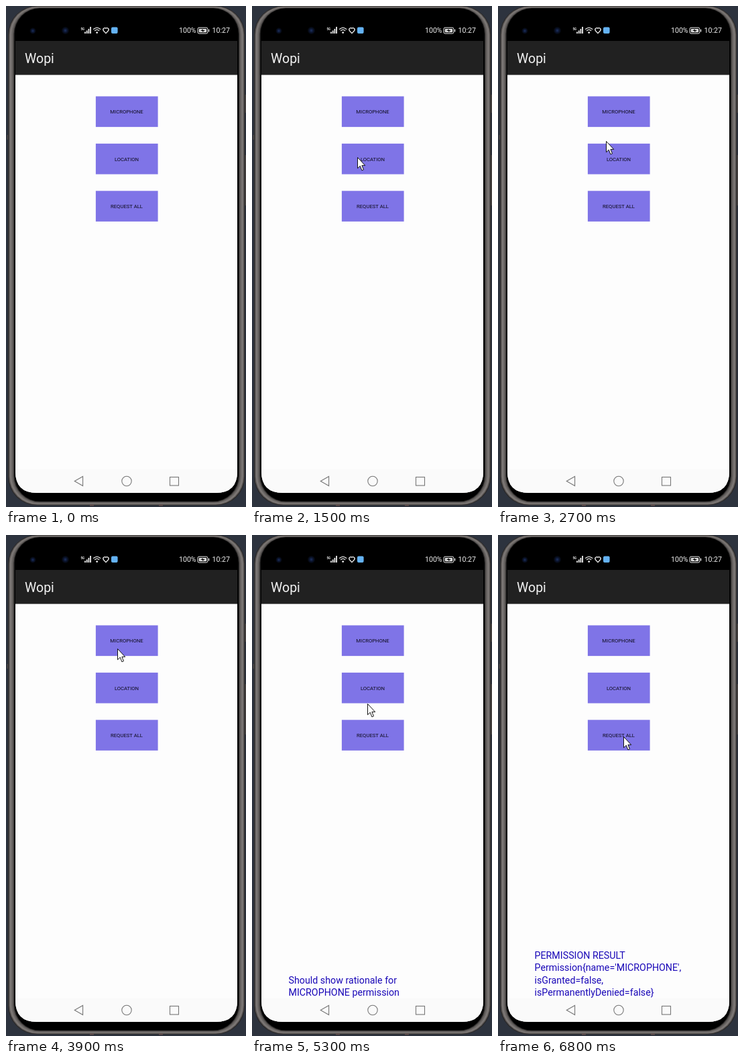
An HTML page for the animation above (8000 ms loop, 358 px wide and 746 px high).

```html
<!DOCTYPE html>
<html lang="en">
<head>
<meta charset="utf-8">
<title>Permission demo</title>
<style>
  html, body { margin: 0; width: 100%; height: 100%; overflow: hidden; background: #2d333e; }
  svg { display: block; width: 358px; height: 746px; font-family: Roboto, "Noto Sans", sans-serif; }
  .label { font-size: 7.7px; text-anchor: middle; fill: #0d0b1c; }
  .toast { font-size: 14.25px; fill: #1a08b8; }
  .status { font-size: 10.6px; fill: #eee; }
  .nav { fill: none; stroke: #777; stroke-width: 1.1; }
</style>
</head>
<body>
<svg viewBox="0 0 358 746">
  <defs>
    <radialGradient id="lens">
      <stop offset="0" stop-color="#1c3060"/>
      <stop offset=".5" stop-color="#0b142c"/>
      <stop offset="1" stop-color="#000"/>
    </radialGradient>
    <clipPath id="screen"><path d="M14 3H345V693Q345 725 313 725H46Q14 725 14 693Z"/></clipPath>
  </defs>

  <!-- phone body -->
  <g fill="#4a4644">
    <rect x="355" y="132" width="3" height="27"/>
    <rect x="355" y="222" width="3" height="75"/>
    <rect x="1.5" y="192" width="3" height="7"/>
  </g>
  <g id="body"></g>
  <g fill="#5b4a48">
    <rect x="125" y="742" width="6" height="2.5"/>
    <rect x="228" y="742" width="6" height="2.5"/>
  </g>

  <g clip-path="url(#screen)">
    <rect x="14" y="52" width="331" height="673" fill="#fdfdfd"/>
    <rect x="14" y="52" width="331" height="50.6" fill="#212121"/>
    <rect x="14" y="690" width="331" height="35" fill="#fafafa"/>
  </g>
  <text x="28" y="85" font-size="19.5" fill="#f2f2f2">Wopi</text>

  <!-- status bar -->
  <circle cx="40" cy="37" r="5" fill="url(#lens)"/>
  <circle cx="88.5" cy="36.5" r="6" fill="url(#lens)"/>
  <text x="111.5" y="35.5" font-size="4.5" font-weight="700" fill="#eee">5G</text>
  <path d="M118 41v-2.5M120.7 41v-4.5M123.4 41v-7M126.1 41v-10" stroke="#eee" stroke-width="1.8"/>
  <g fill="none" stroke="#eee" stroke-width="1.3">
    <path d="M130.3 34.8Q135.7 29.9 141.1 34.8M132.2 37Q135.7 33.8 139.2 37"/>
    <path d="M149 40.6L145.6 37Q143.9 34.7 145.8 33.2Q147.6 32.1 149 33.3Q150.4 32.1 152.2 33.2Q154.1 34.7 152.4 37Z"/>
    <rect x="286" y="32.2" width="14.8" height="8.8" rx="2" stroke-width="1"/>
  </g>
  <circle cx="135.7" cy="39.6" r="1.4" fill="#eee"/>
  <rect x="157" y="31.5" width="9.6" height="9.6" rx="2" fill="#64b2f3"/>
  <text class="status" x="258" y="40.4">100%</text>
  <rect x="287.7" y="34" width="11.4" height="5.2" rx="1" fill="#ddd"/>
  <path d="M290 36.7L294 34.5V36H297L293 38.8V37.2Z" fill="#111"/>
  <path d="M302.6 34.7v3.8" stroke="#eee" stroke-width="1.2"/>
  <text class="status" x="307.5" y="40.4">10:27</text>

  <g id="buttons"></g>

  <!-- navigation -->
  <path class="nav" d="M102.3 707.5L114.6 700.5V714.5Z"/>
  <circle class="nav" cx="180" cy="707.5" r="7.2"/>
  <rect class="nav" x="244.5" y="701.5" width="13" height="12.5"/>

  <g class="toast" id="rationale"></g>
  <g class="toast" id="result"></g>

  <path id="cursor" d="M0 0V16.2L3.8 12.7L6.4 19.3L9 18.2L6.4 11.9H11.2Z"
    fill="#fff" stroke="#111" stroke-width="1" stroke-linejoin="round"/>
</svg>
<script>
const NS = "http://www.w3.org/2000/svg";
const byId = id => document.getElementById(id);

function add(parent, tag, attrs, text) {
  const el = document.createElementNS(NS, tag);
  for (const key in attrs) el.setAttribute(key, attrs[key]);
  if (text) el.textContent = text;
  return byId(parent).appendChild(el);
}

// Nested rims from the outer edge to the black glass: [inset, colour]
[[0, "#2a2828"], [1.3, "#5f5b59"], [2.8, "#7d7876"], [5, "#6b6765"], [7, "#55514f"], [8.6, "#232222"], [9.8, "#000"]]
  .forEach(([inset, fill]) => add("body", "rect", {
    x: 3 + inset, y: inset * .35, width: 353.5 - 2 * inset,
    height: 743.5 - inset * .95, rx: 43 - inset * .5, fill
  }));

["MICROPHONE", "LOCATION", "REQUEST ALL"].forEach((name, i) => {
  const y = 134.5 + i * 70.4;
  add("buttons", "rect", { x: 133.9, y, width: 92.7, height: 45.6, fill: "#7f74e7" });
  add("buttons", "text", { class: "label", x: 180, y: y + 25.6 }, name);
});

// Lines are stacked upwards from the bottom baseline
function toast(id, lines) {
  lines.forEach((line, i) =>
    add(id, "text", { x: 54.5, y: 685.8 - (lines.length - 1 - i) * 18.2 }, line));
}
toast("rationale", ["Should show rationale for", "MICROPHONE permission"]);
toast("result", ["PERMISSION RESULT", "Permission{name='MICROPHONE',", "isGranted=false,", "isPermanentlyDenied=false}"]);

// Rows: time, then values
const path = [
  [500, 2, 228], [700, 76, 168], [900, 136, 131], [1300, 158, 152],
  [1400, 158, 175], [1800, 152, 375], [2100, 146, 306], [2200, 149, 282],
  [2900, 166, 169], [3900, 166, 169], [4300, 165, 172], [4700, 149, 188],
  [5600, 184, 282], [5800, 188, 295], [6000, 188, 295], [6400, 187, 300], [8000, 187, 300]
];
const rationaleFade = [[4400, 0], [4700, .9], [4800, 1], [5600, 1], [5800, 0]];
const resultFade = [[6400, 0], [6600, 1]];

function sample(rows, t) {
  if (t <= rows[0][0]) return rows[0].slice(1);
  const i = rows.findIndex(row => row[0] > t);
  if (i < 0) return rows[rows.length - 1].slice(1);
  const a = rows[i - 1], b = rows[i], k = (t - a[0]) / (b[0] - a[0]);
  return a.slice(1).map((v, j) => v + (b[j + 1] - v) * k);
}

const LOOP = 8000, STEP = 100;
const start = performance.now();

function draw() {
  const now = (performance.now() - start) % LOOP;
  const t = Math.floor(now / STEP) * STEP;
  const [x, y] = sample(path, t).map(Math.round);
  byId("cursor").setAttribute("transform", `translate(${x + .5} ${y + .5})`);
  byId("cursor").setAttribute("visibility", t < 500 ? "hidden" : "visible");
  byId("rationale").setAttribute("opacity", sample(rationaleFade, t)[0]);
  byId("result").setAttribute("opacity", sample(resultFade, t)[0]);
  requestAnimationFrame(draw);
}
draw();
</script>
</body>
</html>
```
